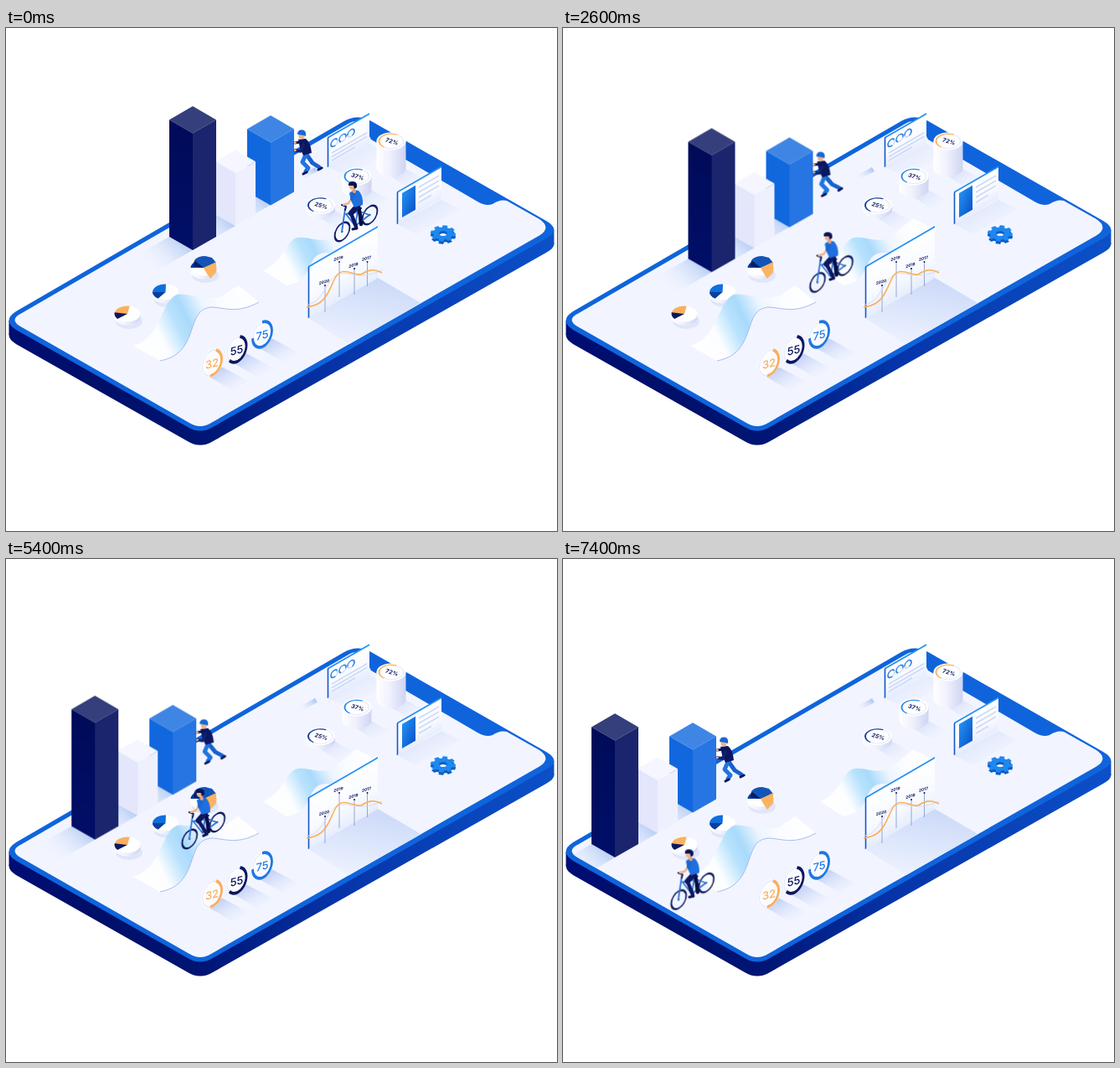
An HTML page for the animation above (7.5 s loop, 658x600 px).

```html
<!DOCTYPE html>
<html lang="en">
<head>
<meta charset="utf-8">
<title>Isometric dashboard</title>
<style>
  html, body { margin: 0; width: 100%; height: 100%; overflow: hidden; background: #fff; }
  svg { display: block; width: 658px; height: 600px; }
  text { font-family: Inter, "Open Sans", sans-serif; text-anchor: middle; }

  /* every segment lasts 800 ms and moves in 100 ms steps */
  .push { animation: push 7.5s steps(8) infinite; }
  .ride { animation: ride 7.5s steps(8) infinite; }
  .stride { transform-origin: 359px 151px; animation: stride 7.5s ease-in-out infinite; }
  .shin { transform-origin: 413px 221px; animation: pedal .75s ease-in-out infinite alternate; }

  @keyframes push {
    0% { transform: translate(0, 0); }
    10.6667% { transform: translate(-13px, 7px); }
    21.3333% { transform: translate(-26px, 14.5px); }
    32% { transform: translate(-41px, 23.5px); }
    42.6667% { transform: translate(-59px, 34.5px); }
    53.3333% { transform: translate(-79px, 46.5px); }
    64% { transform: translate(-101px, 60px); }
    74.6667% { transform: translate(-122px, 73px); }
    85.3333% { transform: translate(-141.5px, 81px); }
    96% { transform: translate(-157px, 89px); animation-timing-function: steps(3); }
    100% { transform: translate(-163px, 92px); }
  }
  @keyframes ride {
    0% { transform: translate(0, 0); }
    10.6667% { transform: translate(-38px, 15px); }
    21.3333% { transform: translate(-68.5px, 26px); }
    32% { transform: translate(-92px, 58px); }
    42.6667% { transform: translate(-114px, 68px); }
    53.3333% { transform: translate(-137px, 66px); }
    64% { transform: translate(-162px, 70px); }
    74.6667% { transform: translate(-189px, 98px); }
    85.3333% { transform: translate(-218px, 133px); }
    96% { transform: translate(-254px, 160px); animation-timing-function: steps(3); }
    100% { transform: translate(-268px, 165px); }
  }
  @keyframes stride { 50% { transform: rotate(-7deg); } }
  @keyframes pedal { to { transform: rotate(-13deg); } }
</style>
</head>
<body>
<svg viewBox="0 0 658 600">
  <defs>
    <linearGradient id="side" gradientUnits="userSpaceOnUse" x1="3" x2="655"><stop offset="0" stop-color="#000d74"/><stop offset=".15" stop-color="#000f68"/><stop offset=".36" stop-color="#001574"/><stop offset=".6" stop-color="#0634a8"/><stop offset="1" stop-color="#0c50c8"/></linearGradient>
    <linearGradient id="cast" x1="1" y1="0" x2="0" y2=".6"><stop offset="0" stop-color="#9dbcf0"/><stop offset="1" stop-color="#f2f5ff" stop-opacity="0"/></linearGradient>
    <linearGradient id="fade" x1="0" y1="0" x2="1" y2="1"><stop offset="0" stop-color="#a9bdf0"/><stop offset="1" stop-color="#f2f5ff" stop-opacity="0"/></linearGradient>
    <linearGradient id="floor" x1=".65" y1="0" x2=".4" y2="1"><stop offset="0" stop-color="#cbd9f8"/><stop offset="1" stop-color="#eff3ff"/></linearGradient>
    <linearGradient id="wave" x1="0" y1=".6" x2="1" y2=".3"><stop offset="0" stop-color="#fff"/><stop offset=".18" stop-color="#fcfdff"/><stop offset=".34" stop-color="#b8e2fd"/><stop offset=".44" stop-color="#a9dafb"/><stop offset=".6" stop-color="#ecf5ff"/><stop offset=".75" stop-color="#fbfcff"/><stop offset="1" stop-color="#fff"/></linearGradient>
    <linearGradient id="drum"><stop offset="0" stop-color="#fff"/><stop offset=".45" stop-color="#f0f1fd"/><stop offset="1" stop-color="#cfd4f2"/></linearGradient>
    <linearGradient id="glass" x2="0" y2="1"><stop offset="0" stop-color="#fff"/><stop offset=".6" stop-color="#f8faff"/><stop offset="1" stop-color="#e6edfd"/></linearGradient>
    <linearGradient id="ink" x2="0" y2="1"><stop offset="0" stop-color="#000b58"/><stop offset="1" stop-color="#000f68"/></linearGradient>
    <linearGradient id="photo" x2="1" y2="1"><stop offset="0" stop-color="#2390f2"/><stop offset="1" stop-color="#0b55ca"/></linearGradient>
    <path id="screen" d="M19 340 L410 113.500 Q418 109 426 114 L436 133 L563 207 Q573 213 581 210 Q590 204 598 206 L637 228 Q652 238 637 247.500 L245 471 Q232 479 219 471 L19 357 Q2 348 19 340Z"/>
    <path id="body" d="M12 338 L404 111 Q420 102 436 111 L645 230 Q664 241 645 251 L247 476 Q232 485 217 476 L12 360 Q-5 349 12 338Z"/>
    <clipPath id="onScreen"><use href="#screen"/></clipPath>
  </defs>

  <use href="#body" y="17" fill="url(#side)"/>
  <path d="M3.500 349h20v17h-20Z M634.500 241h20v17h-20Z" fill="url(#side)"/>
  <use href="#body" fill="#0f64dc"/>
  <use href="#screen" fill="#f2f5ff"/>

  <path d="M344 180 L369 166 L372 171 L351 182Z" fill="url(#cast)"/>
  <g id="props"></g>
  <g clip-path="url(#onScreen)"><g id="shades" class="push"></g></g>

  <g class="push">
    <g id="towers"></g>
    <g fill="none" stroke-linecap="round" stroke-linejoin="round">
      <g class="stride"><path d="M359 151 L366 161 L374 166" stroke="#1760cf" stroke-width="5"/><path d="M373 169 L377 167" stroke="#0a1354" stroke-width="3"/></g>
      <path d="M358 151 L354 160 L361 167 L358 171" stroke="#1f74e0" stroke-width="5"/>
      <path d="M355 174 L359 172" stroke="#0a1354" stroke-width="3"/>
      <path d="M353 136 L345 137" stroke="#0a1354" stroke-width="3"/>
      <path d="M349 133 L358 132 Q364 137 365 149 L355 152 L351 143Z" fill="#0c1760"/>
      <path d="M355 139 L352 147 L345 146" stroke="#13226f" stroke-width="3.5"/>
      <path d="M345 137h.5 M345 146h.5" stroke="#f0b48c" stroke-width="2.5"/>
    </g>
    <circle cx="353" cy="129" r="3.6" fill="#f0b48c"/>
    <path d="M348 127 Q348 121 354 121.500 Q359 122 358 129 L355 128Z" fill="#1768d8"/>
  </g>

  <g class="ride"><g transform="translate(-1)" fill="none" stroke-linecap="round" stroke-linejoin="round">
    <g id="wheels"></g>
    <path d="M435 223 L418 236 L421 218 L435 223 M421 219 L407 222 L418 236 M406 216 L402 243" stroke="#2b74d4" stroke-width="1.8"/>
    <path d="M402 211 L407 213 L406 217 M418 217 L425 215" stroke="#101b5e" stroke-width="2"/>
    <path d="M422 213 L424 224 L425 234" stroke="#060d45" stroke-width="4.500"/>
    <path d="M421 212 L413 221" stroke="#0d1862" stroke-width="6.500"/>
    <g class="shin"><path d="M413 221 L419 237" stroke="#0d1862" stroke-width="4.500"/><path d="M415 240 L420 239" stroke="#0a1354" stroke-width="3"/></g>
    <path d="M411 197 Q416 192 422 194 Q428 200 427 211 L417 214 L413 206Z" fill="#1f70de"/>
    <path d="M414 203 L410 209 L404 211" stroke="#f0b48c" stroke-width="2.4"/>
    <path d="M416 198 L414 204" stroke="#1b66cf" stroke-width="4"/>
    <path d="M416 192 L417 195" stroke="#e6a179" stroke-width="4"/>
    <circle cx="415" cy="189" r="4" fill="#f0b48c"/>
    <path d="M410 188 Q409 183 415 183 Q421 183 420 190 L417 192 L416 188Z" fill="#0a1354"/>
  </g></g>
</svg>
<script>
  const $ = id => document.getElementById(id);
  const poly = (points, fill) => `<polygon points="${points}" fill="${fill}"/>`;
  const NAVY = '#0c1760', ORANGE = '#fbb05d';

  // x, y: front top corner; w: half width; h: height
  const tower = (x, y, w, h, top, left, right) => {
    const d = w * .575;
    return poly([x, y, x - w, y - d, x, y - 2 * d, x + w, y - d], top)
      + poly([x, y, x - w, y - d, x - w, y - d + h, x, y + h], left)
      + poly([x, y, x + w, y - d, x + w, y - d + h, x, y + h], right);
  };
  const shade = (x, y, w) =>
    poly([x, y, x - w, y - w * .575, x - w - 40, y - w * .575 + 23, x - 40, y + 23], 'url(#cast)');

  const arc = (size, turn, color, width, r) =>
    `<circle r="${r}" fill="none" stroke="${color}" stroke-width="${width}" pathLength="100"
      stroke-dasharray="${size} 100" transform="rotate(${turn})"/>`;

  const drum = (x, y, h, label, color) => `
    <path d="M${x} ${y + h + 10} l17 -9 l22 12 l-18 11Z" fill="url(#fade)" opacity=".5"/>
    <path d="M${x - 17.5} ${y}v${h}a17.500 10.500 0 0 0 35 0v${-h}Z" fill="url(#drum)"/>
    <ellipse cx="${x}" cy="${y}" rx="17.500" ry="10.500" fill="#fff"/>
    <g transform="translate(${x} ${y}) scale(1 .6)">${arc(100, 0, '#e8ebfa', 1.5, 14.5)}${arc(48, 125, color, 2, 14.5)}</g>
    <text transform="matrix(.85 .25 -.35 .8 ${x} ${y + 2.5})" font-size="7.800" font-weight="700" fill="${NAVY}">${label}</text>`;

  // slice: [start angle, end angle, colour]
  const pie = (x, y, slices) => {
    const at = a => `${x + 15.5 * Math.cos(a * Math.PI / 180)} ${y + 9.5 * Math.sin(a * Math.PI / 180)}`;
    return `<ellipse cx="${x + 2}" cy="${y + 9}" rx="16" ry="9" fill="#d3dcf6" opacity=".6"/>
      <path d="M${x - 15.5} ${y}v4a15.500 9.500 0 0 0 31 0v-4Z" fill="url(#drum)"/>
      <ellipse cx="${x}" cy="${y}" rx="15.500" ry="9.500" fill="#fff"/>`
      + slices.map(([a, b, c]) => `<path d="M${x} ${y}L${at(a)}A15.500 9.500 0 0 1 ${at(b)}Z" fill="${c}"/>`).join('');
  };

  const dial = (x, y, label, color, size, turn) => `
    <path d="M${x - 6} ${y + 15} L${x + 12} ${y + 5} L${x + 44} ${y + 22} L${x + 25} ${y + 33}Z" fill="url(#fade)"/>
    <g transform="translate(${x} ${y}) skewY(-22) scale(1 1.28)">
      <circle r="12.800" fill="#fbfcff"/>${arc(100, 0, '#e3e8fa', 1, 11.5)}${arc(size, turn, color, 2.8, 11.5)}
    </g>
    <text transform="translate(${x} ${y + 5.5}) skewY(-14)" font-size="13" font-weight="500" fill="${color}">${label}</text>`;

  const panel = (x, y, w, h, content) => `<g transform="matrix(1 -.577 0 1 ${x} ${y})">
    <rect width="${w}" height="${h}" fill="url(#glass)"/>${content}
    <path d="M0 0H${w}" stroke="#2590f0" stroke-width="2"/><path d="M.5 0V${h}" stroke="#1258c8" stroke-width="1.600"/></g>`;
  const rule = (x, y, w) => `<path d="M${x} ${y}h${w}" stroke="#cbd8f6" stroke-width="1.800"/>`;

  const wave = (back, front) => `<path d="${back} ${front}Z" fill="url(#wave)"/>`;

  const teeth = Array.from({ length: 8 }, (_, i) =>
    `<rect x="-3" y="-15" width="6" height="8" rx="1" transform="rotate(${i * 45 + 10})"/>`).join('');
  const gear = (y, color) => `<g transform="translate(522 ${y}) scale(1 .64)" fill="${color}">
    ${teeth}<circle r="8.300" fill="none" stroke="${color}" stroke-width="7"/></g>`;

  const year = (label, x, y, h) => `
    <path d="M${x} ${y + 4}v${h}" stroke="#8d9dd0" stroke-width=".9"/>
    <circle cx="${x}" cy="${y + 4}" r="1" fill="${NAVY}"/>
    <text transform="translate(${x - 1} ${y + 1.5}) skewY(-16)" font-size="4.800" font-weight="700" fill="${NAVY}">${label}</text>`;

  $('props').innerHTML =
    '<path d="M384 166 L434 138 L455 150 L408 177Z" fill="url(#fade)" opacity=".4"/>'
    + panel(384, 131, 50, 35,
      [8, 18, 28].map(x => `<g transform="translate(${x} 10.500)">${arc(100, 0, '#bcd6f8', 1.4, 4)}${arc(72, 30 + x * 5, '#2c7fe2', 1.5, 4)}</g>`).join('')
      + rule(5, 21, 42) + rule(5, 25.5, 42) + rule(5, 30, 28))
    + drum(460, 135, 32, '72%', ORANGE)
    + drum(419, 177, 15, '37%', '#2f8ce8')
    + drum(375.5, 211.5, 5, '25%', '#1a3fa4')
    + '<path d="M467 234 L520 205 L542 216 L490 246Z" fill="url(#fade)" opacity=".5"/>'
    + panel(467, 196, 53, 38, '<rect x="6" y="4.500" width="16" height="29" fill="url(#photo)"/>'
      + rule(26, 9, 24) + rule(26, 15, 24) + rule(26, 21, 24) + rule(26, 27, 15))
    + gear(248, '#0d5cc4') + gear(245, '#1e88ee')
    + wave('M307 289 C332 280 334 251 349 250 C362 248 374 258 392 249 L418 227',
      'L446 241 L400 268 C385 270 372 262 364 282 C358 296 352 304 335 307')
    + '<g clip-path="url(#onScreen)"><path d="M361 346 L444 298 L497 329 L418 383Z" fill="url(#floor)"/></g>'
    + panel(361, 285, 83, 61, '')
    + year('2020', 381, 303, 32) + year('2019', 398, 275, 42) + year('2018', 416, 283, 31) + year('2017', 431.5, 275, 29)
    + '<g fill="none"><path d="M361 330 C380 326 384 296 399 293 C412 291 422 301 449 289" stroke="#d9dced"/>'
    + `<path d="M359 333 C372 331 378 327 384 317 C391 305 393 291 403 290.500 C412 290 416 295 424 294 C434 288 438 287 449 292" stroke="${ORANGE}" stroke-width="1.600"/></g>`
    + pie(236, 286, [[0, 70, '#f5a856'], [290, 360, ORANGE], [180, 300, '#0b3c96']])
    + '<path d="M236 286 L225 277 Q229 272 238 272 L246 274 L251 280Z" fill="#1354b8"/><path d="M236 286 L251 279 V291 L244 299Z" fill="#fbb361"/><path d="M236 286 L225 277 L224 284Z" fill="#071e68"/>'
    + pie(190.5, 315, [[165, 272, '#0f6fdc'], [125, 180, '#0a3f9e']])
    + pie(145, 341, [[185, 280, ORANGE], [140, 190, NAVY]])
    + wave('M152 379 C187 370 186 319 207 317.500 C222 317 240 326 258 320 L277 307',
      'L302 327 C276 341 263 334 246 333 C230 334 227 345 221 362 C214 383 204 393 184 397')
    + '<path d="M184 397 C204 393 214 383 221 362 C227 345 230 334 246 333 C263 334 276 341 302 327" fill="none" stroke="#9fb4ee" stroke-width=".9"/>'
    + dial(246, 399.5, '32', '#f9ad5c', 46, -65)
    + dial(275.5, 383.5, '55', NAVY, 58, -70)
    + dial(306, 365.5, '75', '#1f78e2', 75, -90);

  $('shades').innerHTML = shade(316, 211, 28) + shade(274, 236, 24) + shade(223, 265, 28);
  $('towers').innerHTML = tower(316, 136.5, 28, 75, '#3f86e4', '#1168de', '#2675e2')
    + tower(274, 173, 24, 63, '#f5f6ff', '#e4e6fc', '#eff0fd')
    + tower(223, 125.5, 28, 139.5, '#343f7c', 'url(#ink)', '#1b256d');

  $('wheels').innerHTML = [[435.5, 223], [402.5, 243]].map(([x, y]) =>
    `<g transform="translate(${x} ${y}) skewY(-28) scale(1 1.15)" stroke="#111c62">
      <circle r="8.900" stroke-width="1.900"/><circle r="1" fill="#111c62" stroke="none"/></g>`).join('');
</script>
</body>
</html>
```
